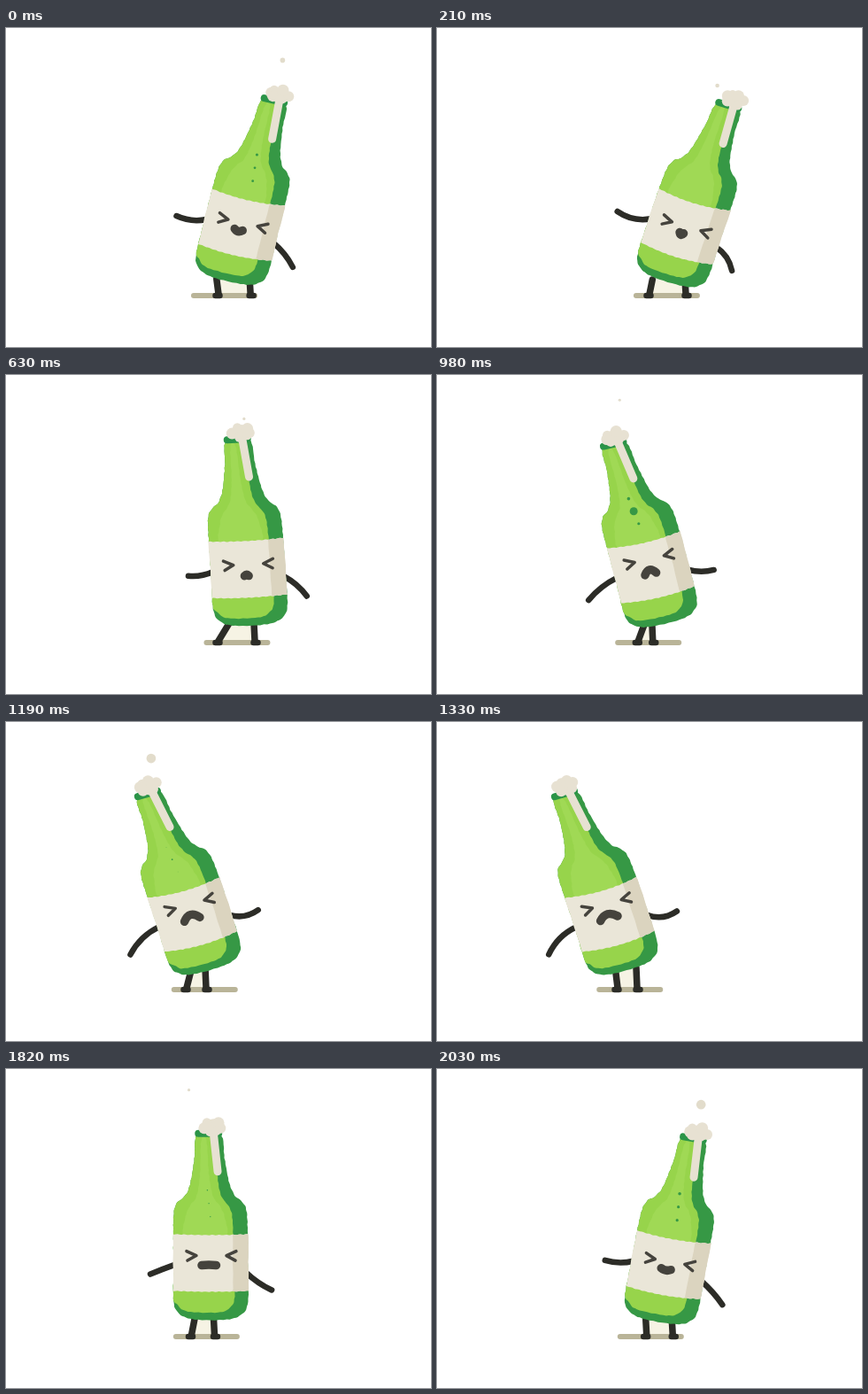
Write an HTML page with a canvas that moves like this. It is 480 px wide and 360 px high and loops after 2100 ms.

```html
<!DOCTYPE html>
<html lang="en">
<head>
<meta charset="utf-8">
<title>Swaying bottle</title>
<style>
html, body { margin: 0; width: 100%; height: 100%; overflow: hidden; background: #fff; }
canvas { display: block; width: 480px; height: 360px; }
</style>
</head>
<body>
<canvas id="stage" width="480" height="360"></canvas>
<script>
const ctx = document.getElementById('stage').getContext('2d');
const LOOP = 2100, STEP = 70, TAU = Math.PI * 2;
const INK = '#2c2c27', FACE = '#45433d', FOAM = '#e7e1d2';
const DARK = '#369845', LIGHT = '#97d44b', PALE = '#a0d955';

// Key points of the sway: time, base x, tilt in degrees.
const SWAY = [[0, 251, 13], [210, 261, 17], [630, 277, -3], [980, 257, -13],
  [1330, 214, -16], [1610, 215, -9], [2030, 250, 10]];

const clamp = (v, lo, hi) => Math.min(hi, Math.max(lo, v));
const mix = (a, b, k) => a + (b - a) * k;

function hermite(a, b, ma, mb, s) {
  const s2 = s * s, s3 = s2 * s;
  return (2 * s3 - 3 * s2 + 1) * a + (3 * s2 - 2 * s3) * b +
    (s3 - 2 * s2 + s) * ma + (s3 - s2) * mb;
}

// Smooth looping value of one SWAY column.
function sway(col, t) {
  const n = SWAY.length;
  const key = i => SWAY[(i + n) % n];
  const time = i => key(i)[0] + Math.floor(i / n) * LOOP;
  const slope = i => (key(i + 1)[col] - key(i - 1)[col]) / (time(i + 1) - time(i - 1));
  let i = n - 1;
  while (SWAY[i][0] > t) i--;
  const span = time(i + 1) - time(i);
  return hermite(key(i)[col], key(i + 1)[col], slope(i) * span, slope(i + 1) * span,
    (t - time(i)) / span);
}

let now, x, y, tilt, bend, sin, cos;

// One swing per loop, highest at the given angle of the cycle.
const wave = (mid, amp, peak) => mid + amp * Math.cos(TAU * (now / LOOP - peak / 360));

// Bottle space (u across, v up from the base) to stage.
function warp(u, v) {
  u += bend * (v / 210) ** 2;
  return [x + u * cos + v * sin, y + u * sin - v * cos];
}

// Closed, slightly rough outline; k = 0 keeps corners, k = 0.5 is smooth.
function trace(pts, k = 0.5) {
  const m = pts.length, seed = now / STEP * 1.7;
  ctx.beginPath();
  for (let i = 0; i < m; i++) {
    const [a, b, c, d] = [-1, 0, 1, 2].map(j => pts[(i + j + m) % m]);
    for (let s = 0; s < 1; s += 0.125) {
      const [u, v] = [0, 1].map(e =>
        hermite(b[e], c[e], k * (c[e] - a[e]), k * (d[e] - b[e]), s));
      ctx.lineTo(...warp(u + 0.3 * Math.sin(v * 0.75 + seed), v + 0.3 * Math.sin(u * 0.8 + seed)));
    }
  }
  ctx.closePath();
}

function fill(pts, color, k) {
  trace(pts, k);
  ctx.fillStyle = color;
  ctx.fill();
}

function stroke(pts, color, width) {
  ctx.beginPath();
  pts.forEach(q => ctx.lineTo(...q));
  ctx.strokeStyle = color;
  ctx.lineWidth = width;
  ctx.stroke();
}

function curve(a, c, b, color, width) {
  ctx.beginPath();
  ctx.moveTo(...a);
  ctx.quadraticCurveTo(...c, ...b);
  ctx.strokeStyle = color;
  ctx.lineWidth = width;
  ctx.stroke();
}

function dot(cx, cy, r, color) {
  ctx.beginPath();
  ctx.arc(cx, cy, Math.max(0, r), 0, TAU);
  ctx.fillStyle = color;
  ctx.fill();
}

function arm(a, b, sag) {
  const dx = b[0] - a[0], dy = b[1] - a[1], k = 2 * sag / Math.hypot(dx, dy);
  curve(a, [(a[0] + b[0]) / 2 - dy * k, (a[1] + b[1]) / 2 + dx * k], b, INK, 6.5);
}

function arms() {
  arm([x + wave(-73, 16, 25), wave(235, 28, 215)], warp(-40, 62), wave(0, 4, 45));
  arm(warp(40, 53), [x + wave(64, 9, 10), wave(243, 31, 30)], wave(0.5, 4, 235));
}

// The feet rest at both ends of their step.
function legs() {
  const left = clamp(wave(232, 45, 72), 204, 240);
  const right = clamp(wave(255, 50, 65), 226, 281);
  const hips = [mix(left, x - 15, 0.55), right - 1];
  const shade = wave(240, 25, 75);
  ctx.fillStyle = '#f6f3e4';
  ctx.beginPath();
  [[hips[0], y - 4], [hips[1], y - 4], [right, 302], [left, 302]].forEach(q => ctx.lineTo(...q));
  ctx.fill();
  stroke([[shade - 34.5, 302], [shade + 34.5, 302]], '#b9b498', 6);
  [left, right].forEach((foot, i) => {
    const toe = i ? 1 : -1;
    stroke([[hips[i], y - 2], [foot, 300]], INK, 7.5);
    stroke([[foot - 2.5 + toe, 302], [foot + 2.5 + toe, 302]], INK, 6.5);
  });
}

// Left half of the outline, mirrored for the right.
const HALF = [[-18, 0], [-35, 6], [-42, 20], [-42, 60], [-42, 100], [-41, 122],
  [-37, 132], [-28, 140], [-22, 154], [-17, 182], [-13, 209]];
const mirror = half => [...half, ...half.map(([u, v]) => [-u, v]).reverse()];
const BODY = mirror(HALF);
const GLOW = mirror([[-22, 92], [-22, 116], [-17, 128], [-9, 140], [-5, 165], [-3, 202]]);
const SHINE = [[-44, 28], [-37, 16], [-26, 9], [8, 8], [21, 13], [27, 26], [26, 70],
  [25, 112], [22, 126], [14, 137], [10, 150], [7, 180], [3, 209],
  [-20, 209], [-28, 152], [-47, 136], [-47, 80]];

// Label from side u0 to the right edge, sagging around the glass.
function label(u0, color) {
  const bow = 1 + 0.2 * Math.abs(tilt), top = [], low = [];
  for (let i = 0; i <= 8; i++) {
    const u = mix(u0, 42.5, i / 8), lift = bow * ((u / 42.5) ** 2 - 0.7);
    top.push([u, 96 + lift]);
    low.unshift([u, 32 + lift]);
  }
  fill([...top, ...low], color, 0);
}

function bottle() {
  fill(BODY, DARK);
  ctx.save();
  trace(BODY);
  ctx.clip();
  fill(SHINE, LIGHT);
  fill(GLOW.map(([u, v]) => [u - 6, v]), PALE);
  ctx.restore();
  label(-42.5, '#eae6d8');
  label(25, '#dbd4bf');
  const fizz = Math.max(0, Math.cos(TAU * (2 * now / LOOP - 330 / 360)));
  for (let i = 0; i < 3; i++) {
    const r = i === 1 ? 1.6 + 3 * Math.max(0, wave(0, 1, 180)) : 1.8 - i * 0.1;
    dot(...warp(-3 + 1.5 * i, 146 - 15 * i), fizz * r, DARK);
  }
  stroke([warp(-12, 210), warp(11, 210)], '#2b9448', 8);
}

function face() {
  const v = wave(71.5, 6, 228), m = v - wave(12, 2.5, 190);
  const w = wave(6, 4.5, 252), c = wave(-1.6, 4, 25);
  for (const d of [-1, 1]) {
    stroke([[28, 5], [17, 0], [27, -5.5]].map(([u, h]) => warp(d * u + 0.8, v + h)), FACE, 3.5);
  }
  curve(warp(-2 - w, m + c / 2), warp(-2, m - c * 1.5), warp(-2 + w, m + c / 2), FACE, 9.5);
}

function foam() {
  stroke([warp(5, 212), warp(9, 167)], FOAM, 9);
  dot(...warp(5, 217), 9.5, FOAM);
  for (let i = 0; i < 6; i++) {
    const a = i * TAU / 6 + 0.4 * Math.sin(TAU * 2 * now / LOOP + i);
    dot(...warp(4 + 10 * Math.cos(a), 218 + 5.5 * Math.sin(a)), 6 + 0.8 * Math.sin(i * 2.3), FOAM);
  }
}

// Five drops a loop; every other one lasts longer.
function drops() {
  const [fx, fy] = warp(4, 218);
  for (let i = 0; i < 5; i++) {
    const age = (now - 170 - 420 * i + LOOP) % LOOP;
    const q = age / (i % 2 ? 430 : 300);
    if (q >= 1) continue;
    const side = 16 * Math.sin(2.05 * i - 1.44) - 5;
    dot(fx + side * (0.9 + 0.4 * q), fy - 12 - 32 * q, 5.6 * Math.sin(Math.PI * q), '#e2dccb');
  }
}

function draw(t) {
  now = t;
  x = sway(1, t);
  tilt = sway(2, t);
  y = 282.7 + 0.2 * tilt;
  bend = 0.6 * tilt - 2.5;
  sin = Math.sin(tilt * TAU / 360);
  cos = Math.cos(tilt * TAU / 360);
  ctx.fillStyle = '#fff';
  ctx.fillRect(0, 0, 480, 360);
  ctx.lineCap = ctx.lineJoin = 'round';
  legs();
  arms();
  bottle();
  face();
  foam();
  drops();
}

const start = performance.now();
function tick() {
  const t = (performance.now() - start) % LOOP;
  draw(Math.floor(t / STEP) * STEP);
  requestAnimationFrame(tick);
}
tick();
</script>
</body>
</html>
```
